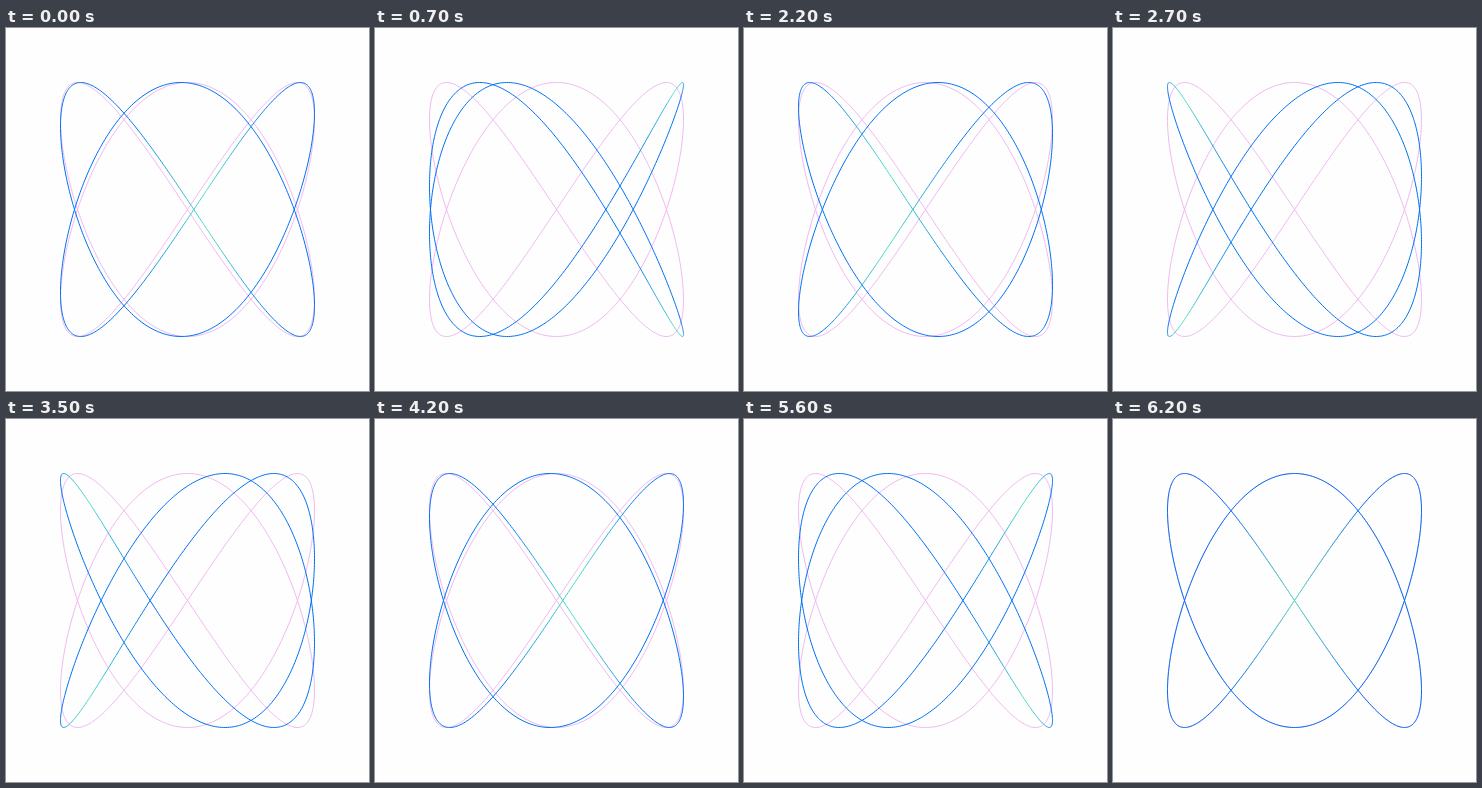
Animation of 363x363 px, one loop 6300 ms. Source, as an HTML page with a canvas:

```html
<!DOCTYPE html>
<html lang="en">
<head>
<meta charset="utf-8">
<title>Lissajous curve</title>
<style>
  html, body { margin: 0; width: 100%; height: 100%; overflow: hidden; background: #fefefe; }
  canvas { display: block; width: 363px; height: 363px; }
</style>
</head>
<body>
<canvas id="stage"></canvas>
<script>
const SIZE = 363, MID = 181.5, RADIUS = 127;
const STEP = 100, STEPS = 63, TAU = Math.PI * 2;
const BLUE = [0, 112, 243], CYAN = [80, 227, 194], PINK = '#f1b9f1';
const GLOW = 0.3, SLICES = 28;

const canvas = document.getElementById('stage');
const ctx = canvas.getContext('2d');
const scale = window.devicePixelRatio || 1;
canvas.width = canvas.height = SIZE * scale;
ctx.scale(scale, scale);

const mix = k => `rgb(${BLUE.map((c, i) => Math.round(c + (CYAN[i] - c) * k))})`;

// Strokes the curve between two parameter values.
function arc(from, to, phase, color) {
  const count = Math.max(2, Math.ceil((to - from) * 120));
  ctx.beginPath();
  for (let i = 0; i <= count; i++) {
    const s = from + (to - from) * i / count;
    ctx.lineTo(MID + RADIUS * Math.sin(2 * s + phase),
               MID - RADIUS * Math.cos(3 * s + phase));
  }
  ctx.strokeStyle = color;
  ctx.stroke();
}

function dots() {
  ctx.fillStyle = '#f7f7f7';
  for (let x = 16.5; x < SIZE; x += 16.5)
    for (let y = 16.5; y < SIZE; y += 16.5)
      ctx.fillRect(Math.round(x), Math.round(y), 1, 1);
}

function draw(step) {
  const phase = -Math.PI * (step + 1) / 21;
  ctx.fillStyle = '#fefefe';
  ctx.fillRect(0, 0, SIZE, SIZE);
  dots();
  ctx.lineWidth = 1;
  arc(0, TAU, 0, PINK);
  for (const peak of [Math.PI / 2, Math.PI * 1.5]) {
    arc(peak + GLOW, peak + Math.PI - GLOW, phase, mix(0));
    const slice = 2 * GLOW / SLICES;
    for (let i = 0; i < SLICES; i++) {
      const s = peak - GLOW + i * slice;
      arc(s, s + slice, phase, mix(1 - Math.abs(s + slice / 2 - peak) / GLOW));
    }
  }
}

let shown = -1;
const start = performance.now();
function tick() {
  const step = Math.floor((performance.now() - start) / STEP) % STEPS;
  if (step !== shown) draw(shown = step);
  requestAnimationFrame(tick);
}
tick();
</script>
</body>
</html>
```
